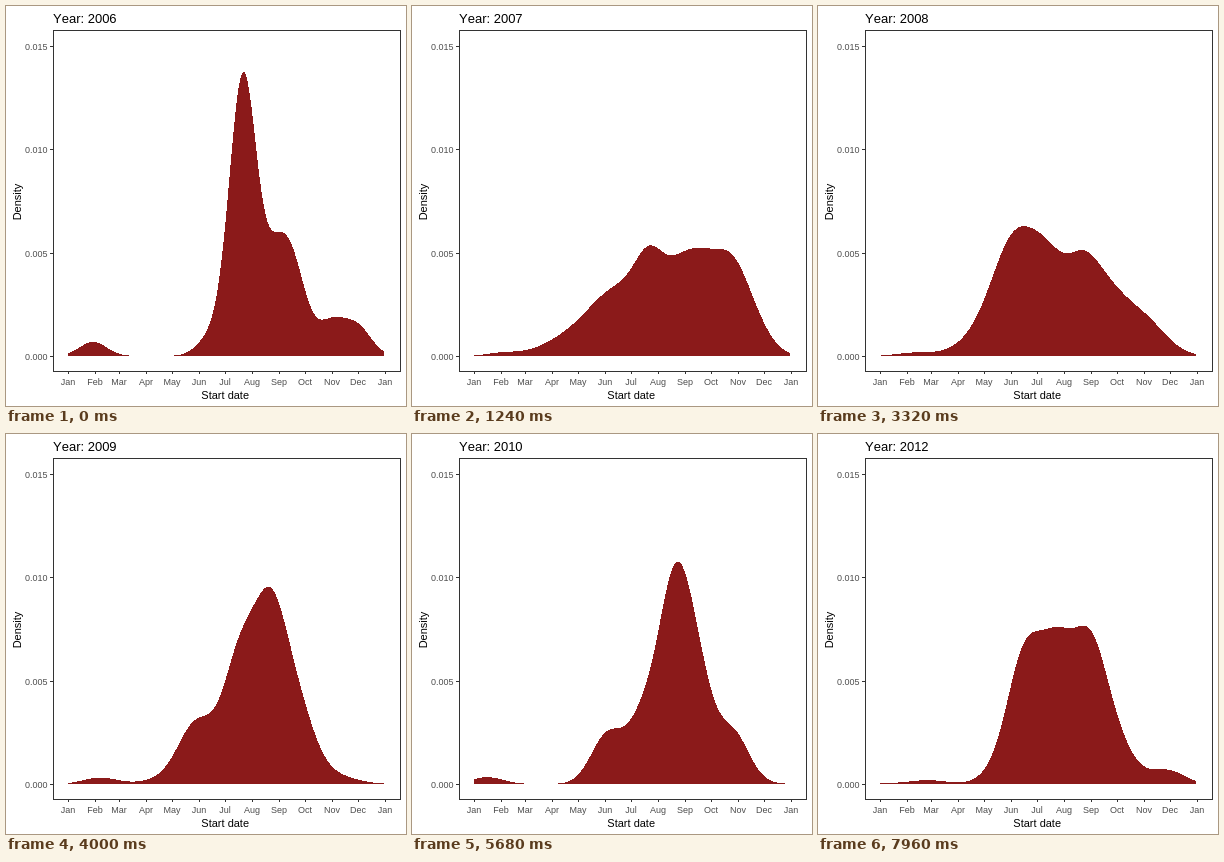
An HTML page with a canvas that plays this animation: 400 by 400 pixels, repeating every 8 s.

```html
<!DOCTYPE html>
<html lang="en">
<head>
<meta charset="utf-8">
<title>Start date density by year</title>
<style>
  html, body { margin: 0; width: 100%; height: 100%; overflow: hidden; background: #fff; }
  canvas { display: block; width: 100%; height: 100%; }
</style>
</head>
<body>
<canvas id="chart" width="400" height="400"></canvas>
<script>
const ctx = document.getElementById('chart').getContext('2d');

const LOOP = 8000, STEP = 40, YEAR_MS = 1410, FIRST_YEAR = 2006;
const LEFT = 62, RIGHT = 378, BASE = 350;
const PANEL = { x: 47, y: 24, w: 347, h: 341 };
const FONT = '"Liberation Sans", Arial, sans-serif';

// Kernel density of one year: a sum of equally wide bell curves,
// each given as [centre in half months, height in pixels].
const bells = (width, ...peaks) => u => peaks.reduce(
  (sum, [centre, height]) => sum + height * Math.exp(-(((u - centre) / width) ** 2) / 2), 0);

const years = [
  bells(1.05, [1.9, 14], [10.9, 18], [13.3, 278], [15.8, 79], [17.2, 70], [20, 32], [22, 28]),
  bells(1.7, [3.5, 3], [7, 18], [10, 54], [13, 61], [16.2, 78], [19.5, 100]),
  bells(1.75, [5, 3.5], [8.5, 48], [11, 153], [16.5, 37], [19.8, 59]),
  bells(1.25, [2.4, 7.5], [9.6, 44], [13.1, 130], [15.4, 186], [17.5, 70]),
  bells(1.2, [1, 7], [10.1, 48], [12.9, 60], [15.2, 181], [17, 94], [19.7, 50]),
  bells(1.25, [.8, 2], [5, 3], [9, 32], [11.6, 132], [13.8, 92], [16.15, 141], [19.8, 14], [22, 20]),
  bells(1.25, [3.4, 5], [10.75, 130], [13.4, 130], [15.8, 120], [17.9, 55], [21.8, 9])
];

function text(str, x, y, size, color, align = 'left') {
  ctx.font = `${size}px ${FONT}`;
  ctx.fontKerning = 'none';
  ctx.fillStyle = color;
  ctx.textAlign = align;
  ctx.fillText(str, x, y);
}

function drawAxes() {
  ctx.strokeStyle = '#333';
  ctx.lineWidth = 1;
  ctx.strokeRect(PANEL.x + .5, PANEL.y + .5, PANEL.w, PANEL.h);

  const months = 'Jan Feb Mar Apr May Jun Jul Aug Sep Oct Nov Dec Jan'.split(' ');
  months.forEach((name, i) => {
    const day = (Date.UTC(2007, i, 1) - Date.UTC(2007, 0, 1)) / 864e5;
    const x = LEFT + Math.round(day * 316.6 / 365);
    ctx.fillStyle = '#333';
    ctx.fillRect(x, PANEL.y + PANEL.h + 1, 1, 2);
    text(name, x, 379, 9, '#4d4d4d', 'center');
  });

  for (let i = 0; i < 4; i++) {
    const y = Math.round(BASE - i * 103.4);
    ctx.fillStyle = '#333';
    ctx.fillRect(PANEL.x - 3, y, 3, 1);
    text((i * .005).toFixed(3), 41.5, y + 4, 9, '#4d4d4d', 'right');
  }

  text('Start date', 219.2, 393, 11, '#000', 'center');
  ctx.save();
  ctx.translate(15, 196);
  ctx.rotate(-Math.PI / 2);
  text('Density', 0, 0, 11, '#000', 'center');
  ctx.restore();
}

function drawDensity(pos) {
  const k = Math.floor(pos), mix = pos - k;
  ctx.fillStyle = '#8b1a1a';
  for (let x = LEFT; x < RIGHT; x++) {
    const u = (x + .5 - LEFT) / (RIGHT - LEFT) * 24;
    const h = Math.round(years[k](u) * (1 - mix) + years[k + 1](u) * mix);
    ctx.fillRect(x, BASE - h, 1, h);
  }
}

function draw(t) {
  const pos = t / YEAR_MS;
  ctx.fillStyle = '#fff';
  ctx.fillRect(0, 0, 400, 400);
  drawDensity(pos);
  drawAxes();
  text('Year: ' + Math.round(FIRST_YEAR + pos), 47, 17, 13, '#000');
}

const start = performance.now();
function tick() {
  const t = (performance.now() - start) % LOOP;
  draw(Math.floor(t / STEP) * STEP);
  requestAnimationFrame(tick);
}
tick();
</script>
</body>
</html>
```
